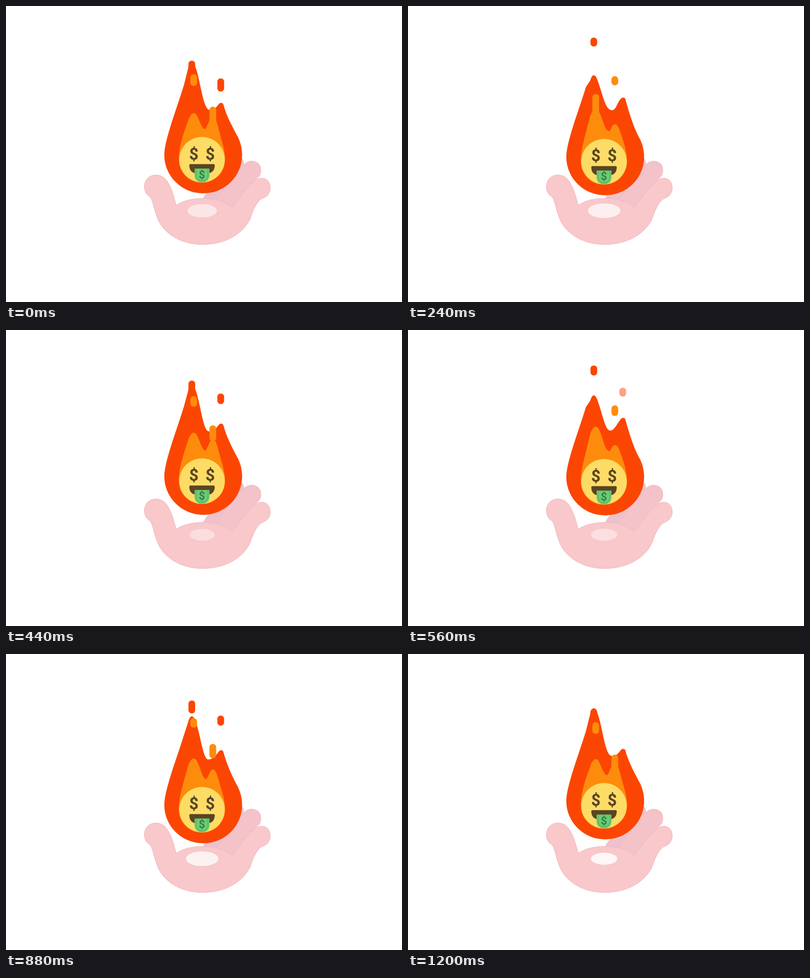
These frames come from a looping animation (800 by 600 pixels, 1.24 s). An HTML page:

```html
<!DOCTYPE html>
<html lang="en">
<head>
<meta charset="utf-8">
<title>Flame</title>
<style>
html, body { margin: 0; width: 100%; height: 100%; overflow: hidden; background: #fff; }
svg { display: block; width: 100vw; height: 100vh; }
text { font-family: Roboto, sans-serif; font-weight: 700; text-anchor: middle; }
</style>
</head>
<body>
<svg viewBox="0 0 800 600">
  <g id="hand">
    <path fill="#edc2cc" d="M397 392 C412 362 440 350 477 309 Q480 312 481 319 L440 392Z"/>
    <path fill="#f4c2c9" stroke="#f0b7c0" d="M425 394 C450 350 464 335 482 320 C492 311 508 313 513.500 325 C518 340 511 347 504 352 L460 408Z"/>
    <path fill="#f8c8cb" stroke="#f4b5bc" d="M344 404 C340 390 336 372 328 359 C321 346 312 342.500 302 342.500 C289 342.500 279.500 353 279.500 366 C279.500 376 284 383 291 387 C297 395 298 409 304 425 C314 458 350 483.500 397 483.500 C442 483.500 478 463 493 432 C499 414 506 398 516 391 C527 387 534 380 534 369 C534 356 526 349 517 349 C506 349 501 356 495 362 C482 372 470 393 457 408 C443 396 424 390 398 390 C374 390 354 396 344 404Z"/>
    <ellipse id="glow" cx="396.300" cy="415" fill="#fff"/>
  </g>
  <path id="outer" fill="#fb4603"/>
  <g id="redDrops" fill="#fb4603"></g>
  <path id="inner" fill="#fe8c0c"/>
  <g id="orangeDrops" fill="#fe8c0c"></g>
  <g id="face">
    <circle cx="396" cy="311.500" r="46" fill="#fddc66"/>
    <g fill="#5a4422" font-size="33">
      <text x="379.500" y="310.500">$</text>
      <text x="412.500" y="310.500">$</text>
      <path d="M372.500 320.500 H419.500 Q422 320.500 421.700 324 C421.500 335 413 340 404 340 H388 C379 340 370.500 335 370.300 324 Q370 320.500 372.500 320.500Z"/>
    </g>
    <path fill="#6ccb74" d="M381 329.500 H411 V343 C411 353 404 357.500 396 357.500 C388 357.500 381 353 381 343Z"/>
    <path fill="none" stroke="#46a45a" d="M384 329.500 V343 C384 351 390 354.500 396 354.500 C402 354.500 408 351 408 343 V329.500"/>
    <text x="395.800" y="349.500" font-size="22.500" fill="#2f8444">$</text>
  </g>
</svg>
<script>
const STEP = 40, STEPS = 31, CYCLE = 10, BOB = 16;
const $ = id => document.getElementById(id);
const set = (el, attrs) => { for (const k in attrs) el.setAttribute(k, attrs[k]); };

// A drop stretches slowly, snaps off, then drifts up while shrinking.
function rise(s) {
  if (s < 3) return 0.14 * s;
  if (s < 4) return 0.42 + 0.31 * (s - 3);
  return 0.73 + 0.0675 * (s - 4);
}

// Times are in steps; the drop climbs from y0 to y1.
const DROPS = [
  { layer: 'redDrops', x: 375.4, from: 9, life: 8.5, y0: 119, y1: 60, length: 33 },
  { layer: 'redDrops', x: 433.8, from: 7, life: 7.5, y0: 171, y1: 113, length: 34, until: 25 },
  { layer: 'orangeDrops', x: 379.2, from: 5, life: 8, y0: 187, y1: 126, length: 49 },
  { layer: 'orangeDrops', x: 417.8, from: 9, life: 8.5, y0: 215, y1: 137, length: 38 }
];
for (const d of DROPS) {
  d.el = document.createElementNS('http://www.w3.org/2000/svg', 'rect');
  set(d.el, { x: d.x - 6.8, width: 13.6, rx: 6.5 });
  $(d.layer).append(d.el);
}

function drawDrop(d, i) {
  const s = (i - d.from + CYCLE) % CYCLE;
  const u = rise(s);
  const gone = i >= d.until;
  set(d.el, {
    y: d.y0 + (d.y1 - d.y0) * u,
    height: 17 + (d.length - 17) * Math.max(0, 1 - u),
    opacity: gone ? 0 : Math.min(1, Math.max(0, d.life - s))
  });
}

const wave = (p, mid, amp, peak) => mid + amp * Math.cos(2 * Math.PI * (p - peak) / CYCLE);

function outerPath(p) {
  const tip = wave(p, 126.5, 12.5, 5);
  const side = wave(p, 188.5, 8, 0.1);
  const vx = wave(p, 411, 3, 8), vy = wave(p, 209, 1.8, 0.3);
  return `M319.8 302 C319.8 272 344 211 359.500 160 L368.500 ${tip + 10}
    C372 ${tip - 3.5} 378 ${tip - 3.5} 382.5 ${tip + 9}
    C393 ${tip + 36} 398 ${vy} ${vx} ${vy}
    C${vx + 8} ${vy} 422 ${side + 12} 428.5 ${side + 4}
    C432 ${side - 1.5} 438 ${side - 2} 439.5 ${side + 4}
    C445 ${side + 25} 455 240 466 261
    C473 273 477 287 477 302 A78.6 77.8 0 0 1 319.8 302Z`;
}

function innerPath(p) {
  const left = wave(p, 210, 9, 9.3);
  const right = wave(p, 231, 7, 4.7);
  const vx = wave(p, 404.5, 2.7, 4.7);
  return `M349 311.5 C349 284 359 257 367 ${left + 17}
    C374 ${left - 5} 382 ${left - 6} 388 ${left + 9}
    C395 ${left + 25} 398 249.5 ${vx} 249.5
    C${vx + 4} 249.5 411 ${right} 418 ${right}
    C426 ${right} 430 256 436 273
    C440 287 442.5 299 442.5 311.5 A46.75 46.75 0 0 1 349 311.5Z`;
}

function draw(now) {
  const i = Math.floor(now / STEP) % STEPS;
  const dy = 5.6 * Math.sin(2 * Math.PI * i / BOB);
  const transform = `translate(0 ${dy})`;

  set($('outer'), { d: outerPath(i), transform });
  set($('inner'), { d: innerPath(i), transform });
  set($('face'), { transform });
  set($('glow'), {
    rx: 29.7 + 0.77 * dy,
    ry: 13.5 + 0.33 * dy,
    opacity: i < BOB ? 0.55 + 0.035 * dy : 0.8 - 0.01 * dy
  });
  for (const d of DROPS) drawDrop(d, i);
}

const start = performance.now();
function tick() {
  draw(performance.now() - start);
  requestAnimationFrame(tick);
}
tick();
</script>
</body>
</html>
```
